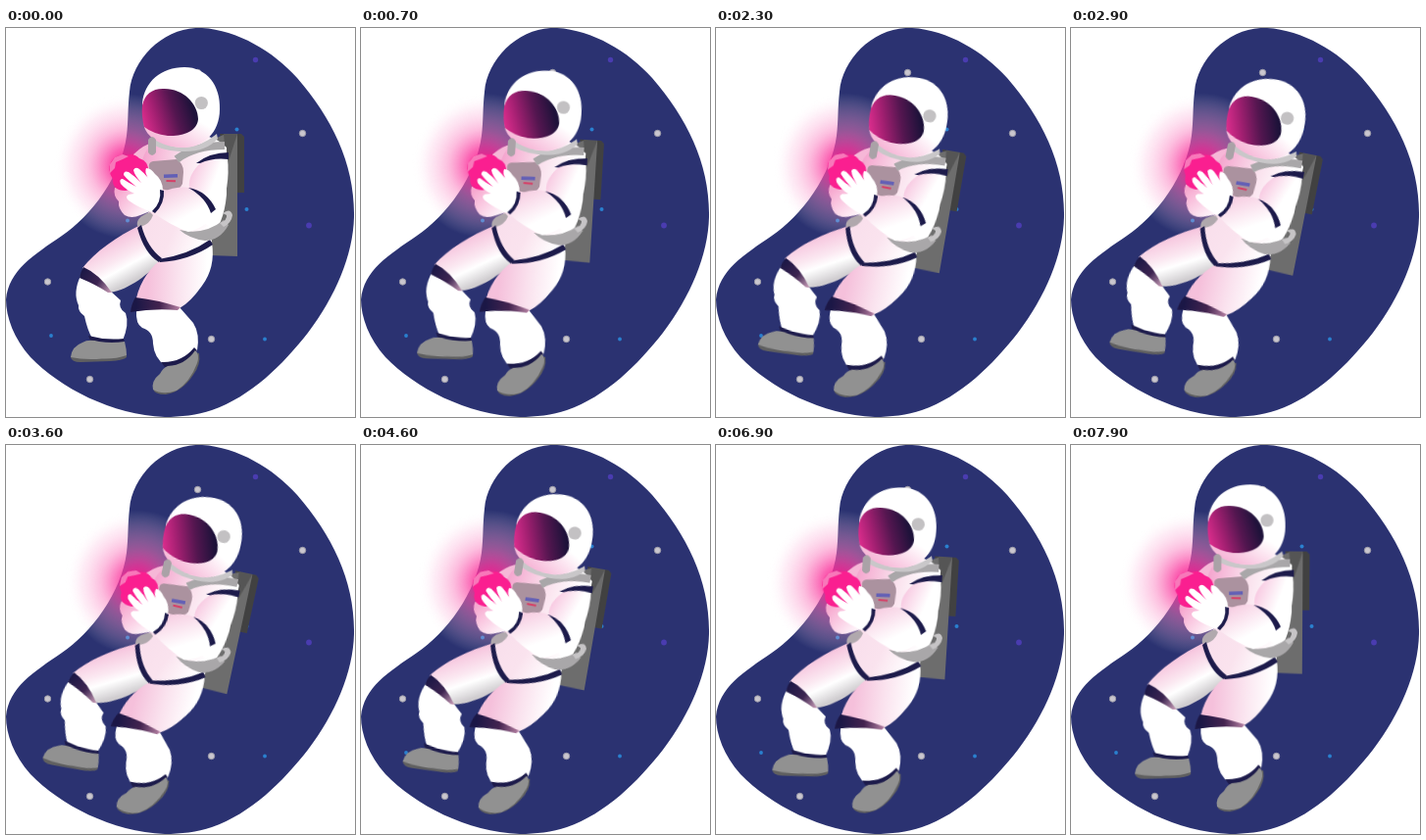
Recreate the animation shown at these times as an HTML page. Size 356x397 px, loop 8000 ms.

```html
<!DOCTYPE html>
<html lang="en">
<head>
<meta charset="utf-8">
<title>Floating astronaut</title>
<style>
  html, body { margin: 0; width: 100%; height: 100%; overflow: hidden; background: #fff; }
  svg { display: block; width: 100%; height: 100%; }
  .drift {
    transform-box: view-box;
    transform-origin: 130.5px 193px;
    animation: drift 8s infinite;
  }
  @keyframes drift {
    0% { transform: rotate(0deg); animation-timing-function: cubic-bezier(.333, .527, .667, .86); }
    43.75% { transform: rotate(12.3deg); animation-timing-function: cubic-bezier(.333, .26, .667, .593); }
    100% { transform: rotate(0deg); }
  }
  .white { fill: #fff; }
  .navy { fill: #1d1b4b; }
  .boot { fill: #919191; }
  .sole { fill: #606060; }
  .strap { fill: none; stroke: #a9a7a9; }
  .far { fill: #c9c6ce; stroke: #9b9aa8; }
  .blue { fill: #2a80cf; }
  .violet { fill: #4a3cb0; }
</style>
</head>
<body>
<svg viewBox="0 0 356 397" preserveAspectRatio="none">
  <defs>
    <radialGradient id="glow">
      <stop offset="0" stop-color="#fb0a88"/>
      <stop offset=".25" stop-color="#fa3a9f" stop-opacity=".78"/>
      <stop offset=".5" stop-color="#fa7abd" stop-opacity=".5"/>
      <stop offset=".78" stop-color="#fbb4da" stop-opacity=".24"/>
      <stop offset="1" stop-color="#fff" stop-opacity="0"/>
    </radialGradient>
    <linearGradient id="visor" gradientUnits="userSpaceOnUse" x1="140" y1="98" x2="190" y2="82">
      <stop offset="0" stop-color="#dc2d8d"/>
      <stop offset=".3" stop-color="#a01f70"/>
      <stop offset=".65" stop-color="#541650"/>
      <stop offset="1" stop-color="#1e123a"/>
    </linearGradient>
    <linearGradient id="helmet" gradientUnits="userSpaceOnUse" x1="152" y1="122" x2="176" y2="82">
      <stop offset="0" stop-color="#f5a9d0"/>
      <stop offset="1" stop-color="#fff"/>
    </linearGradient>
    <linearGradient id="torso" gradientUnits="userSpaceOnUse" x1="135" y1="150" x2="208" y2="165">
      <stop offset="0" stop-color="#f4a3cd"/>
      <stop offset=".5" stop-color="#f9dcea"/>
      <stop offset="1" stop-color="#fff"/>
    </linearGradient>
    <linearGradient id="arm" gradientUnits="userSpaceOnUse" x1="186" y1="148" x2="212" y2="158">
      <stop offset="0" stop-color="#f7c3de"/>
      <stop offset="1" stop-color="#fff"/>
    </linearGradient>
    <linearGradient id="forearm" gradientUnits="userSpaceOnUse" x1="164" y1="166" x2="184" y2="202">
      <stop offset="0" stop-color="#f7cfe3"/>
      <stop offset=".8" stop-color="#fff"/>
    </linearGradient>
    <linearGradient id="hip" gradientUnits="userSpaceOnUse" x1="143" y1="200" x2="200" y2="224">
      <stop offset="0" stop-color="#f9dfec"/>
      <stop offset=".45" stop-color="#fae3ee"/>
      <stop offset="1" stop-color="#fff"/>
    </linearGradient>
    <linearGradient id="thigh1" gradientUnits="userSpaceOnUse" x1="104" y1="218" x2="128" y2="262">
      <stop offset="0" stop-color="#f6c3dd"/>
      <stop offset=".42" stop-color="#fbe8f1"/>
      <stop offset=".62" stop-color="#fff"/>
      <stop offset=".95" stop-color="#cfcccf"/>
    </linearGradient>
    <linearGradient id="thigh2" gradientUnits="userSpaceOnUse" x1="145" y1="256" x2="205" y2="258">
      <stop offset="0" stop-color="#f5c0db"/>
      <stop offset=".5" stop-color="#fae2ee"/>
      <stop offset="1" stop-color="#fff"/>
    </linearGradient>
    <linearGradient id="band" gradientUnits="userSpaceOnUse" x1="133" y1="284" x2="180" y2="280">
      <stop offset="0" stop-color="#1b1746"/>
      <stop offset=".5" stop-color="#43234f"/>
      <stop offset="1" stop-color="#c78fb0"/>
    </linearGradient>
    <linearGradient id="band1" gradientUnits="userSpaceOnUse" x1="78" y1="247" x2="110" y2="270">
      <stop offset="0" stop-color="#1b1746"/>
      <stop offset=".5" stop-color="#3c2450"/>
      <stop offset="1" stop-color="#dcaec6"/>
    </linearGradient>
    <linearGradient id="cuff" gradientUnits="userSpaceOnUse" x1="115" y1="166" x2="146" y2="192">
      <stop offset="0" stop-color="#f7a9d0"/>
      <stop offset="1" stop-color="#fff"/>
    </linearGradient>
  </defs>

  <path fill="#2b3271" d="M200 0C236 2 273 24 297 51C333 93 356 139 355 193C354 232 336 274 308 311C282 344 250 376 210 390C195 395 178 397 162 397C108 395 55 367 25 336C8 317 0 295 0 277C3 247 28 232 57 212C87 192 118 150 123 110C125 94 124 82 126 65C129 30 163 -2 200 0Z"/>

  <g class="far">
    <circle cx="195.500" cy="45.500" r="3.200"/>
    <circle cx="302.500" cy="107.500" r="3.200"/>
    <circle cx="42.500" cy="259" r="3.200"/>
    <circle cx="209.500" cy="317.500" r="3.200"/>
    <circle cx="85.500" cy="358.500" r="3.200"/>
  </g>
  <g class="blue">
    <circle cx="235.500" cy="103.500" r="2"/>
    <circle cx="245.500" cy="185" r="2"/>
    <circle cx="264" cy="317.500" r="1.900"/>
    <circle cx="46" cy="314" r="1.900"/>
    <circle cx="124" cy="196.500" r="2"/>
  </g>
  <g class="violet">
    <circle cx="254.500" cy="32.500" r="2.700"/>
    <circle cx="309" cy="201.500" r="2.900"/>
  </g>

  <g class="drift">
    <circle cx="123" cy="141" r="74" fill="url(#glow)"/>

    <!-- backpack -->
    <path fill="#414141" d="M218 108L240 108L243 111V168H234Z"/>
    <path fill="#6d6d6d" d="M206 116L224 108H236V233L208 232Z"/>
    <path fill="#555" d="M222 108H236L225 142Z"/>

    <!-- far leg -->
    <path class="white" d="M76 253Q68 270 74 283Q73 289 80 294Q83 308 88 317L119 319Q126 302 122 291Q114 286 117 278L106 268Z"/>
    <path class="navy" d="M84 314Q102 319 120 317L121 321Q101 322 86 319Z"/>
    <path class="sole" d="M66 336Q67 341 76 341L106 340Q120 339 123 336V332H68Z"/>
    <path class="boot" d="M66 336Q67 325 78 321Q84 317 95 320Q108 322 121 320Q123 328 123 334Q112 338 98 337.500Q80 339 66 336Z"/>
    <path fill="url(#thigh1)" d="M137 201C113 213 91 228 78 245L106 270C126 267 147 250 159 236L148 203Z"/>
    <path fill="url(#band1)" d="M79 244Q95 251 108 270L104 270Q92 262 75 255Q76 249 79 244Z"/>

    <!-- far arm -->
    <path fill="#f6b7d7" d="M130 129Q140 119 152 116L160 140L143 150L128 142Z"/>
    <path fill="url(#cuff)" d="M111 163Q109 171 115 177Q114 184 121 191Q128 195 137 191L152 185L146 164Z"/>

    <!-- body -->
    <path fill="url(#torso)" d="M149 118Q134 133 141 151L152 184L162 214L208 212Q222 202 225 170V122Q214 110 199 110Z"/>
    <path fill="url(#hip)" d="M151 184Q139 190 137 203Q145 228 158 237Q190 234 210 218L207 202L170 178Z"/>
    <path fill="#b0a8ad" d="M134 202Q132 193 147 188L150 191Q147 200 137 203Z"/>

    <!-- near leg -->
    <path class="white" d="M133 288Q132 302 139 306Q150 309 150 322Q151 337 163 345Q184 343 195 329Q198 312 191 301Q184 293 177 285Z"/>
    <path class="navy" d="M158 341Q179 342 192 326L195 329Q181 347 162 346Z"/>
    <path class="sole" d="M150 368Q151 374 163 374Q180 371 191 354Q199 343 197 332L193 331Z"/>
    <path class="boot" d="M150 369Q148 360 157 353Q160 347 165 345Q183 344 193 329Q198 333 195 342Q188 361 174 370Q160 375 150 369Z"/>
    <path fill="url(#thigh2)" d="M157 237Q187 235 210 219Q214 244 200 263Q188 280 177 286L132 281Q136 255 157 237Z"/>
    <path fill="url(#band)" d="M132 275Q152 277 178 285L175 288Q151 286 127 290Q128 281 132 275Z"/>
    <path class="navy" d="M134 204L138 201Q144 224 159 235L156 239Q141 230 134 204Z"/>
    <path class="navy" d="M156 236Q187 231 208 216L211 221Q188 237 157 239Z"/>

    <!-- chest pack and straps -->
    <path fill="#ab929f" d="M146 142Q145 137 150 136L174 134Q181 138 181 147L180 159Q177 165 170 167L158 164Q146 156 146 142Z"/>
    <path stroke="#625fb6" stroke-width="3.500" d="M161 151.300L175 150.800"/>
    <path stroke="#d63f67" stroke-width="2" d="M163.500 156L173 156.300"/>
    <path class="strap" stroke-width="8" d="M174 134Q192 120 223 120"/>
    <path fill="#a9a7a9" d="M177 206Q202 212 222 196L227 201Q218 217 203 217Q187 215 177 206Z"/>
    <path fill="#c6c4c6" d="M221 189Q229 183 231 191Q230 199 222 203L218 199Q226 196 225 191Z"/>

    <!-- near arm -->
    <path fill="url(#arm)" d="M200 136Q212 131 226 132Q229 166 217 184Q212 188 210 187L187 163Q185 150 200 136Z"/>
    <path class="navy" d="M194 138Q208 127 227 127L227 134Q211 132 198 138Z"/>
    <path fill="url(#forearm)" d="M158 168Q174 161 188 163L213 186Q207 203 186 208Q169 202 151 189Z"/>
    <path class="navy" d="M186 163Q205 166 214 185L209 189Q204 173 186 163Z"/>

    <!-- glowing ball and hand -->
    <path fill="#fa1f90" d="M107 137Q112 128 121 131Q129 126 136 133Q146 136 145 147L141 160L122 166Q108 166 109 154Q103 145 107 137Z"/>
    <path fill="#f878ba" d="M106 139L111 132L119 129L125 131L119 134L112 137L111 143L106 148Z"/>
    <path class="white" d="M150 188Q136 184 125 176Q121 172 125 170L131 169Q122 165 117 159Q115 154 119 154Q125 158 133 162Q124 155 120 150Q120 145 125 147Q131 151 138 158Q131 150 130 145Q132 141 136 144Q141 148 145 153Q141 147 143 143Q148 143 152 149Q160 155 160 166Q159 178 150 188Z"/>
    <path class="navy" d="M157 165L161 166Q162 179 152 189L149 187Q159 178 157 165Z"/>

    <!-- helmet -->
    <path fill="#c9c7c9" d="M150 112Q184 134 215 108L216 113Q204 126 183 126Q160 126 149 118Z"/>
    <path fill="url(#helmet)" d="M139 77C141 55 158 40 182 40C205 40 219 59 218 83C218 107 201 122 182 122C161 122 145 113 141 101Z"/>
    <path fill="url(#visor)" d="M139 79Q143 62 160 62C180 61 196 77 196 93C195 106 179 111 165 110Q150 108 141 101Q138 90 139 79Z"/>
    <circle cx="199.300" cy="76.500" r="6.600" fill="#c3c1c3"/>
    <path fill="#aaa2a7" d="M145 114Q149 108 153 114L153 127Q149 133 145 127Z"/>
  </g>
</svg>
</body>
</html>
```
